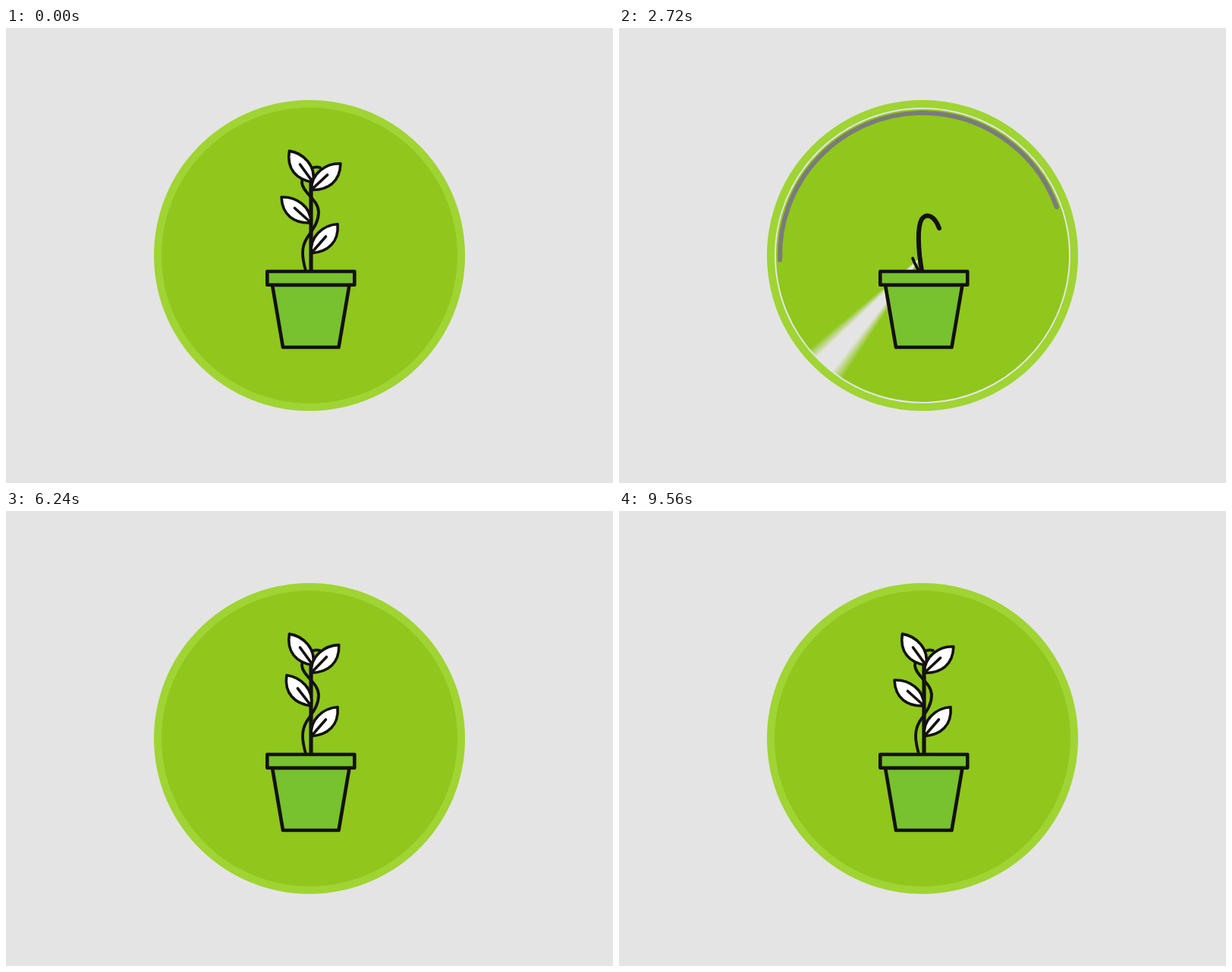
An HTML page with a canvas that plays this animation: 800x600 px, repeating every 9600 ms.

```html
<!DOCTYPE html>
<html lang="en">
<head>
<meta charset="utf-8">
<title>Growing plant</title>
<style>
  html, body { margin: 0; width: 100%; height: 100%; overflow: hidden; background: #e4e4e4; }
  canvas { display: block; }
</style>
</head>
<body>
<canvas id="stage" width="800" height="600"></canvas>
<script>
const ctx = document.getElementById('stage').getContext('2d');
const LOOP = 9600, RESTART = 1640, CX = 400, CY = 300;
const INK = '#14110f', GREEN = '143,199,28', RIM = '#9fd433', POT = '#77c22e', GREY = '#7b7b7b';

const rad = deg => deg * Math.PI / 180;
const clamp = x => Math.min(1, Math.max(0, x));
const mix = (a, b, p) => a + (b - a) * p;
const linear = p => p;
const smooth = p => p * p * (3 - 2 * p);
const outBack = p => 1 + 2.7 * (p - 1) ** 3 + 1.7 * (p - 1) ** 2;
const span = (t, from, to, ease = smooth) => ease(clamp((t - from) / (to - from)));

// Value at time t on a list of [time, value] keys
function track(t, keys, ease = linear) {
  let value = keys[0][1];
  for (let i = 1; i < keys.length; i++) {
    const [t0] = keys[i - 1], [t1, v] = keys[i];
    value = mix(value, v, span(t, t0, t1, ease));
  }
  return value;
}

// Short swing that rises and falls around a moment
const swing = (t, mid, half) =>
  Math.abs(t - mid) < half ? Math.cos((t - mid) / half * Math.PI / 2) ** 2 : 0;

function pen(width, color = INK) {
  ctx.lineWidth = width;
  ctx.strokeStyle = color;
  ctx.lineCap = ctx.lineJoin = 'round';
}

function arc(radius, from, to, width, color, cap = 'round') {
  if (to - from < 0.1) return;
  pen(width, color);
  ctx.lineCap = cap;
  ctx.beginPath();
  ctx.arc(CX, CY, radius, rad(from), rad(Math.min(to, from + 360)));
  ctx.stroke();
}

function drawDisc(t) {
  if (t >= 2840) {
    ctx.fillStyle = `rgb(${GREEN})`;
    ctx.beginPath();
    ctx.arc(CX, CY, track(t, [[2840, 193], [3040, 195.5]]), 0, rad(360));
    ctx.fill();
    return;
  }
  const tail = track(t, [[1680, 222], [1720, 217.5], [2720, 136], [2840, 132]]);
  const head = track(t, [[1680, 223], [1720, 227.5], [2720, 488], [2840, 492]]);
  const width = track(t, [[1680, 2], [1720, 6], [2400, 193]], smooth);
  const radius = track(t, [[1680, 86], [1720, 86], [2400, 96.5]], smooth);
  const sweep = head - tail, turn = sweep / 360;
  const soft = Math.min(4.5, sweep / 3) / 360;
  const softHead = 5 / 360 * clamp(sweep / 300 - 0.05);
  const fill = ctx.createConicGradient(rad(tail), CX, CY);
  fill.addColorStop(0, `rgba(${GREEN},0)`);
  fill.addColorStop(soft, `rgba(${GREEN},1)`);
  fill.addColorStop(turn - softHead, `rgba(${GREEN},1)`);
  fill.addColorStop(turn, `rgba(${GREEN},${softHead > 0 ? 0 : 1})`);
  arc(radius, tail, head, width, fill, 'butt');
}

function drawRings(t) {
  arc(200, 218.7, track(t, [[1680, 218.7], [1720, 227.8], [2500, 579]]), 10, RIM);
  const low = track(t, [[1680, 362.4], [1720, 342.3], [2720, 178.5], [3300, 20]]);
  const high = track(t, [[1720, 362.4], [2720, 340.1], [3300, 20]], smooth);
  arc(188, low, high, 6, GREY);
}

function drawPot(t) {
  const size = span(t, 2000, 2400, outBack);
  if (size <= 0) return;
  ctx.save();
  ctx.translate(401.5, 371);
  ctx.scale(size, size);
  ctx.translate(-401.5, -371);
  pen(4.6);
  ctx.fillStyle = POT;
  for (const shape of [
    'M351 339 L365 421 H438.5 L452.5 339 Z',
    'M344.3 321 H459.3 V338.7 H344.3 Z'
  ]) {
    const path = new Path2D(shape);
    ctx.fill(path);
    ctx.stroke(path);
  }
  ctx.restore();
}

const HOOK = [399, 320, 394, 290, 393, 262, 399, 252, 406, 243, 416, 248, 422, 264];
const STRAIGHT = [402, 320, 402, 300, 402, 280, 402, 250, 402, 230, 402, 210, 402, 188];

function drawStem(t) {
  const grown = span(t, 2380, 2720);
  if (grown <= 0) return;
  const unfurl = span(t, 2720, 3400);
  const p = HOOK.map((v, i) => mix(v, STRAIGHT[i], unfurl));
  pen(mix(6, 5.2, unfurl));
  if (grown < 1) ctx.setLineDash([100 * grown, 400]);
  ctx.beginPath();
  ctx.moveTo(p[0], p[1]);
  ctx.bezierCurveTo(...p.slice(2, 8));
  ctx.bezierCurveTo(...p.slice(8));
  ctx.stroke();
  ctx.setLineDash([]);
}

const VINE = new Path2D('M395 320 C390 302 389 290 396 278 C402 268 412 258 412 243 ' +
  'C412 226 391 218 390 204 C390 190 404 181 414 184');

function drawVine(t) {
  const length = track(t, [[2640, 0], [2720, 18], [3500, 190]]);
  if (length <= 0) return;
  ctx.save();
  ctx.translate(396, 320);
  ctx.rotate(rad(-14 * (1 - span(t, 2720, 3100))));
  ctx.translate(-396, -320);
  pen(3.8);
  ctx.setLineDash([length, 400]);
  ctx.stroke(VINE);
  ctx.restore();
}

const LEAF = new Path2D('M0 0 C-22 1 -38 -10 -39 -34 C-20 -35 0 -22 0 0 Z');
const VEIN = new Path2D('M-21.5 -19.5 L-2 -2');

function drawLeaf(x, y, side, angle, size) {
  if (size <= 0) return;
  ctx.save();
  ctx.translate(x, y);
  ctx.rotate(rad(angle));
  ctx.scale(side * size, size);
  ctx.fillStyle = '#fff';
  ctx.fill(LEAF);
  pen(3.6);
  ctx.stroke(LEAF);
  ctx.stroke(VEIN);
  ctx.restore();
}

function drawLeaves(t) {
  const pop = start => span(t, start, start + 400, outBack);
  drawLeaf(402.5, 297, -1, -7, pop(3200));
  drawLeaf(402, 257, 1, 10.5 * swing(t, 6240, 400), pop(3350));
  drawLeaf(404.5, 203.5, 1, 12 - 12 * swing(t, 8360, 400), pop(3650));
  drawLeaf(402.5, 213.5, -1, -1 - 6 * swing(t, 6400, 350), pop(3500));
}

function draw(now) {
  let t = now % LOOP;
  if (t < RESTART) t += LOOP;
  ctx.fillStyle = '#e4e4e4';
  ctx.fillRect(0, 0, 800, 600);
  if (t > 1680) {
    drawDisc(t);
    drawRings(t);
    drawVine(t);
    drawStem(t);
    drawPot(t);
    drawLeaves(t);
  }
  requestAnimationFrame(draw);
}
draw(0);
</script>
</body>
</html>
```
